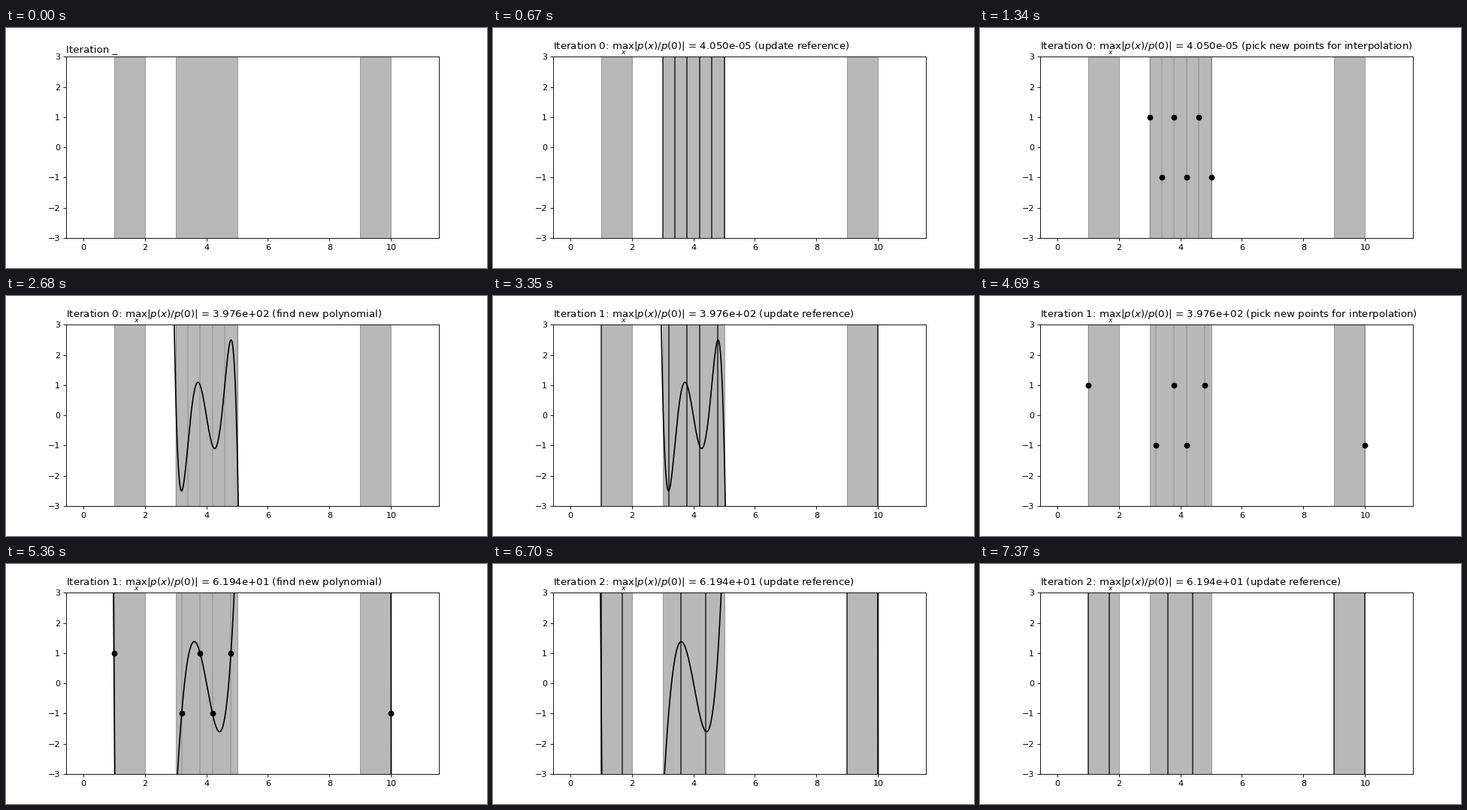
These frames come from a looping animation (640x320 px, 8 s). A matplotlib script:

```python
import numpy as np
import matplotlib.pyplot as plt
from matplotlib.animation import FuncAnimation

LOOP, TICK, HOLD = 8000, 40, 670  # ms
SIGNS = np.array([1, -1, 1, -1, 1, -1])
SETS = [(1, 2), (3, 5), (9, 10)]
REFS = [np.linspace(3, 5, 6),
        np.array([1, 3.2, 3.8, 4.2, 4.8, 10]),
        np.array([1, 1.7, 3.6, 4.4, 9, 10])]
PEAKS = ["4.050e-05", "3.976e+02", "6.194e+01"]
DARK, FAINT = 0.75, 0.13

grid = np.linspace(0, 11, 1001)
curves = [np.polyval(np.polyfit(ref - 4, SIGNS, 5), grid - 4) for ref in REFS[:2]]


def build_steps():
    """Each step: (iteration, peak, note, line alpha, dots shown, curve)."""
    steps = [(0, None, "", 0, False, None)]
    for k in range(3):
        update = (k, k, "update reference", DARK, False)
        if k:
            steps.append(update + (k - 1,))
        steps.append(update + (None,))
        if k < 2:
            steps += [
                (k, k, "pick new points for interpolation", FAINT, True, None),
                (k, k + 1, "find new polynomial", FAINT, True, k),
                (k, k + 1, "find new polynomial", FAINT, False, k),
            ]
    return steps


STEPS = build_steps()

plt.rcParams["font.family"] = "DejaVu Sans"
fig = plt.figure(figsize=(8, 4), dpi=80)
fig.subplots_adjust(left=0.125, right=0.9, bottom=0.125, top=0.88)
ax = fig.add_subplot()
ax.set_xlim(-0.55, 11.55)
ax.set_ylim(-3, 3)
for a, b in SETS:
    ax.axvspan(a, b, color="k", alpha=0.28)
lines = [ax.axvline(0, color="k", lw=1.5) for _ in SIGNS]
curve, = ax.plot([], [], "k", lw=1.5)
dots, = ax.plot([], [], "ko", ms=6)


def draw(i):
    step = min((i * TICK + TICK - 10) // HOLD, len(STEPS) - 1)
    k, peak, note, alpha, show_dots, c = STEPS[step]
    if peak is None:
        title = "Iteration _"
    else:
        title = rf"Iteration {k}: $\max_x|p(x)/p(0)|$ = {PEAKS[peak]} ({note})"
    ax.set_title(title, loc="left")
    for line, x in zip(lines, REFS[k]):
        line.set_xdata([x, x])
        line.set_alpha(alpha)
        line.set_visible(alpha > 0)
    dots.set_data(REFS[k], SIGNS)
    dots.set_visible(show_dots)
    curve.set_visible(c is not None)
    if c is not None:
        curve.set_data(grid, curves[c])
    return []


anim = FuncAnimation(fig, draw, frames=LOOP // TICK, interval=TICK,
                     repeat=True, repeat_delay=0, blit=False)
plt.show()
```
